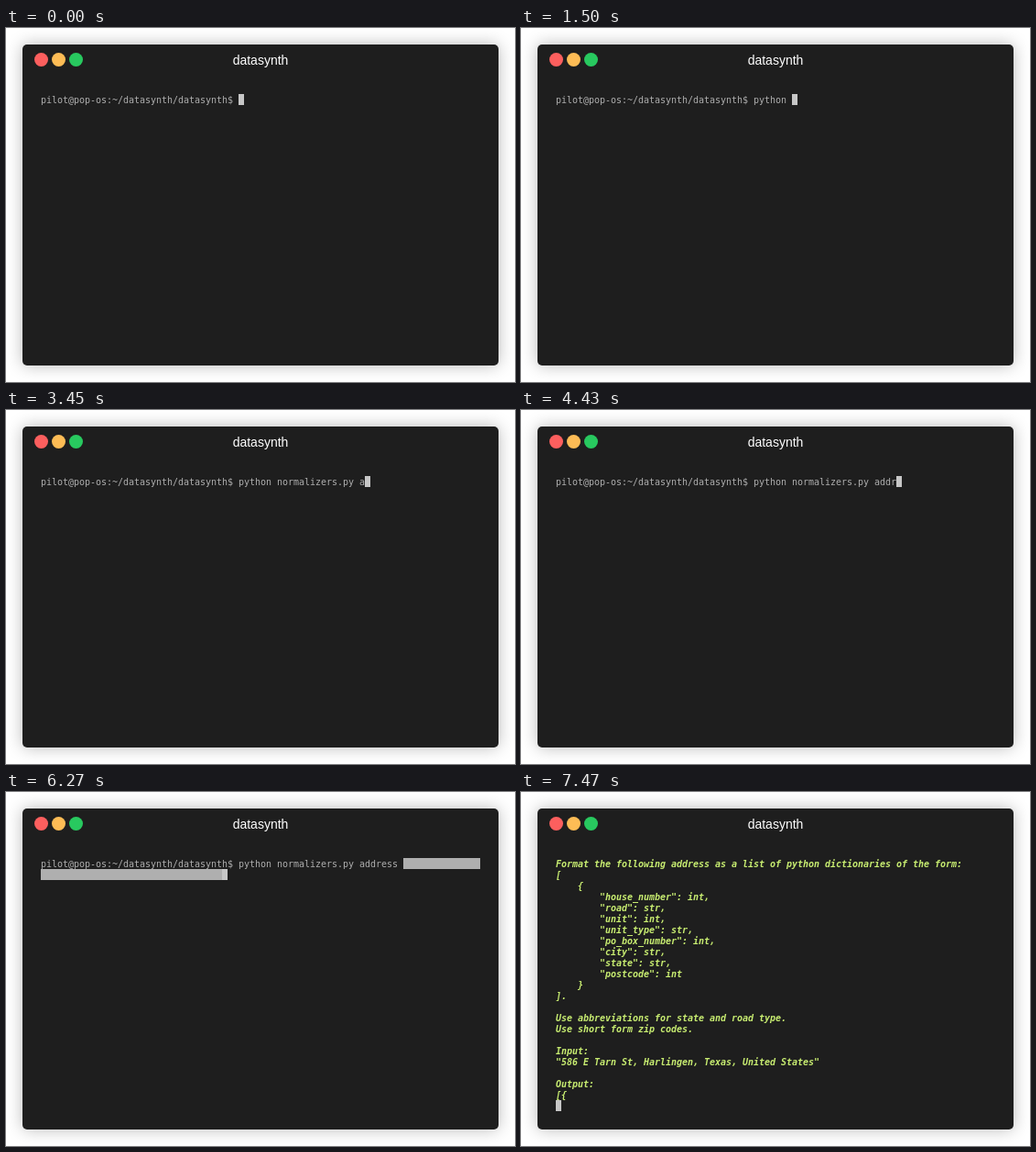
An HTML page that plays this animation: 556 px wide and 386 px high, repeating every 8 s.

```html
<!DOCTYPE html>
<html lang="en">
<head>
<meta charset="utf-8">
<title>datasynth</title>
<style>
html, body { margin: 0; width: 100%; height: 100%; overflow: hidden; background: #fff; }
#win { position: absolute; left: 18px; top: 18px; width: 520px; height: 350px; border-radius: 5px;
  background: #1e1e1e; box-shadow: 0 0 18px rgba(0, 0, 0, .28); }
svg { position: absolute; left: 0; top: 0; }
.title { font: 14px "Liberation Sans", Arial, sans-serif; fill: #fff; text-anchor: middle; }
#screen { font: 10px "DejaVu Sans Mono", monospace; fill: #afafaf; }
#screen text { white-space: pre; }
#screen.output { font-weight: bold; font-style: italic; fill: #c8ed71; }
#cursor { fill: #c7c7c7; }
</style>
</head>
<body>
<div id="win"></div>
<svg width="556" height="386">
  <circle cx="38.5" cy="34.5" r="7.5" fill="#fc5f5e"/>
  <circle cx="57.5" cy="34.5" r="7.5" fill="#fdbc55"/>
  <circle cx="76.5" cy="34.5" r="7.5" fill="#28c95f"/>
  <text class="title" x="278" y="40">datasynth</text>
  <g id="paste" fill="#afafaf">
    <rect x="434" y="72" width="84" height="12"/>
    <rect x="38" y="84" width="204" height="12"/>
  </g>
  <g id="screen"></g>
  <rect id="cursor" width="6" height="12"/>
</svg>
<script>
const LOOP = 8000, LEFT = 38, TOP = 72, CELL = 6, LINE = 12;
const PASTE = 6270, ENTER = 6890, OUTPUT = 7470;
const prompt = 'pilot@pop-os:~/datasynth/datasynth$ ';
const command = 'python normalizers.py address ';
const street = '586 E Tarn St', place = ', Harlingen, Texas, United States';

// [time, number of command characters shown]; the file name is tab-completed
const keys = [[0, 0], [500, 1], [770, 2], [950, 3], [1060, 4], [1160, 5], [1300, 6], [1500, 7],
  [2340, 8], [2460, 9], [2580, 22], [3450, 23], [3660, 24], [4210, 25], [4430, 26],
  [4590, 27], [4880, 28], [5040, 29], [5190, 30]];

const output = `Format the following address as a list of python dictionaries of the form:
[
    {
        "house_number": int,
        "road": str,
        "unit": int,
        "unit_type": str,
        "po_box_number": int,
        "city": str,
        "state": str,
        "postcode": int
    }
].

Use abbreviations for state and road type.
Use short form zip codes.

Input:
"${street}${place}"

Output:
[{
`.split('\n');

const el = id => document.getElementById(id);
const screen = el('screen'), cursor = el('cursor'), paste = el('paste');

function textLine(str, row) {
  const t = document.createElementNS('http://www.w3.org/2000/svg', 'text');
  t.setAttribute('x', [...str].map((_, i) => LEFT + i * CELL).join(' '));
  t.setAttribute('y', TOP + 10 + row * LINE);
  t.textContent = str;
  return t;
}

function show(lines, col, row) {
  screen.replaceChildren(...lines.map(textLine));
  cursor.setAttribute('x', LEFT + col * CELL);
  cursor.setAttribute('y', TOP + row * LINE);
}

function draw(time) {
  screen.classList.toggle('output', time >= OUTPUT);
  paste.style.display = time >= PASTE && time < ENTER ? '' : 'none';
  if (time >= OUTPUT) return show(output, 0, output.length - 1);
  if (time >= ENTER) return show([prompt + command + '"' + street, place + '"'], 0, 2);
  const typed = prompt + command.slice(0, keys.findLast(k => k[0] <= time)[1]);
  if (time >= PASTE) show([typed], place.length, 1);
  else show([typed], typed.length, 0);
}

const start = performance.now();
function tick() {
  draw((performance.now() - start) % LOOP);
  requestAnimationFrame(tick);
}
tick();
</script>
</body>
</html>
```
